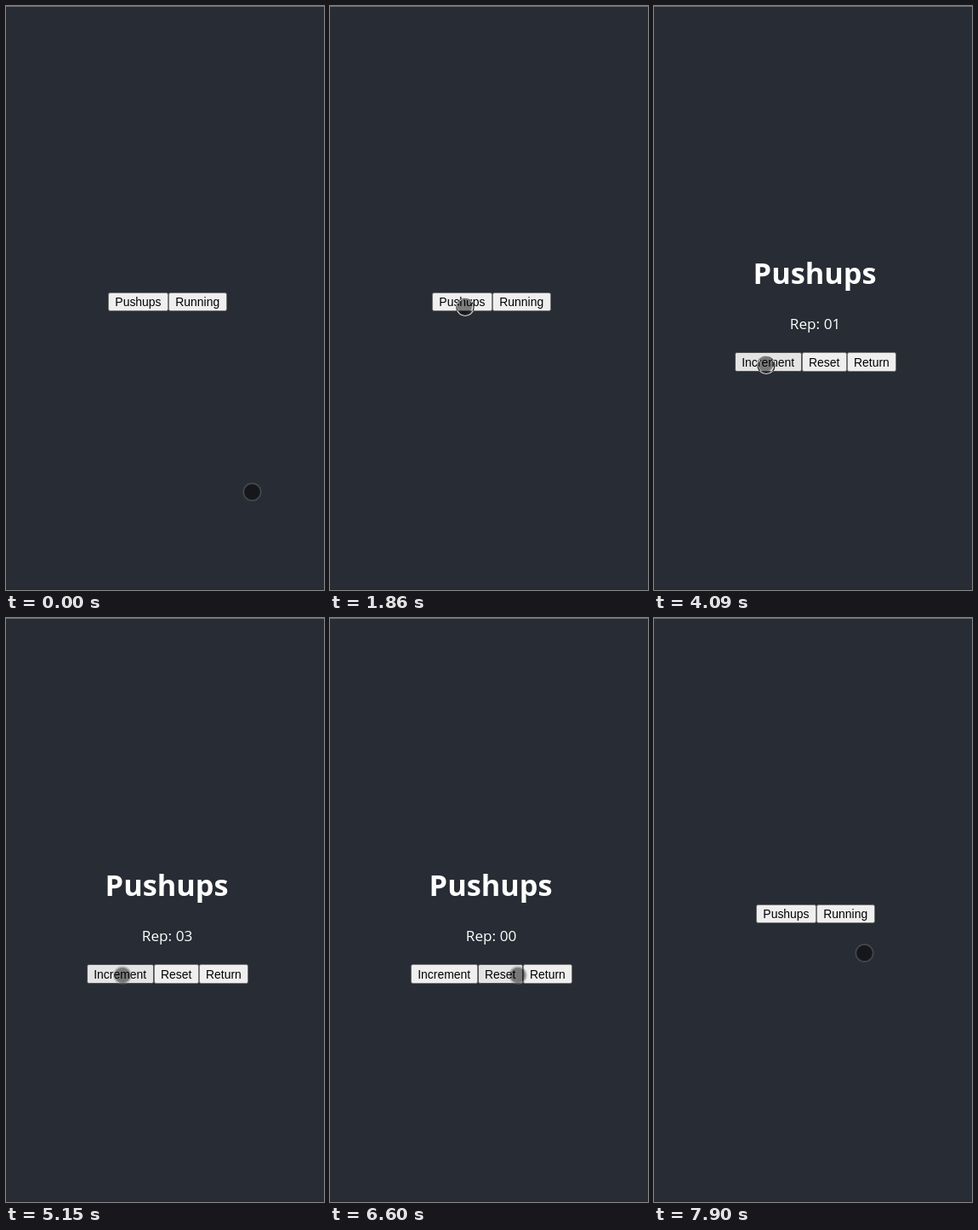
Write an HTML page that moves like this. It is 374 by 685 pixels and loops after 8000 ms.

```html
<!DOCTYPE html>
<html lang="en">
<head>
<meta charset="utf-8">
<title>Rep counter</title>
<style>
  html, body { margin: 0; width: 100%; height: 100%; overflow: hidden; background: #282c34; }
  svg { display: block; width: 374px; height: 685px; }
  text { fill: #fff; font-family: "Open Sans", "Noto Sans", sans-serif; white-space: pre; }
  .button rect { fill: #efefef; stroke: #767676; }
  .button text { fill: #000; font: 13.93px "Liberation Sans", Arial, sans-serif; }
  .button.hover rect { fill: #e4e4e4; stroke: #4f4f4f; }
  .button.active rect { fill: #f5f5f5; stroke: #8d8d8d; }
  #ring { fill: none; stroke: #fff; stroke-width: 1.2; mix-blend-mode: difference; }
</style>
</head>
<body>
<svg viewBox="0 0 374 685">
  <defs>
    <radialGradient id="shade">
      <stop offset=".78" stop-opacity=".48"/>
      <stop offset="1" stop-opacity=".34"/>
    </radialGradient>
  </defs>
  <rect width="374" height="685" fill="#282c34"/>
  <rect width="374" height="1" fill="#6a6d72"/>
  <rect y="684" width="374" height="1" fill="#23272e"/>
  <g id="menu"></g>
  <g id="counter">
    <text x="116.6" y="326" font-size="34.3" font-weight="700">Pushups</text>
    <text id="reps" x="159.8" y="379" font-size="17.2"></text>
  </g>
  <g id="cursor">
    <circle r="9.6" fill="url(#shade)"/>
    <circle id="edge" r="10.2" fill="none" stroke="#808488" stroke-opacity=".32" stroke-width="1.7"/>
  </g>
  <circle id="ring" r="10"/>
</svg>
<script>
const LOOP = 8000;
const FRAME = 110;
const PRESS = 150;
const RELEASE = 120;
const $ = id => document.getElementById(id);

function svgNode(parent, name, attrs) {
  const node = document.createElementNS("http://www.w3.org/2000/svg", name);
  for (const key in attrs) node.setAttribute(key, attrs[key]);
  return parent.appendChild(node);
}

// Lays labelled buttons side by side, each as wide as its text plus padding
const buttons = {};
function buttonRow(parent, labels, left, top, height) {
  const padding = 8.36;
  for (const label of labels) {
    const group = svgNode(parent, "g", { class: "button" });
    const box = svgNode(group, "rect", { y: top + .5, height: height - 1, rx: 2 });
    const text = svgNode(group, "text", { x: left + padding, y: top + height - 6 });
    text.textContent = label;
    const right = left + text.getComputedTextLength() + 2 * padding;
    const snapped = Math.round(left);
    box.setAttribute("x", snapped + .5);
    box.setAttribute("width", Math.round(right) - snapped - 1);
    buttons[label] = group;
    left = right;
  }
}
buttonRow($("menu"), ["Pushups", "Running"], 120, 336, 22);
buttonRow($("counter"), ["Increment", "Reset", "Return"], 94.9, 406, 23);

const glides = [
  { start: 240, end: 240, x: 281, y: 561 },
  { start: 380, end: 840, x: 223.5, y: 439 },
  { start: 960, end: 1090, x: 203, y: 403 },
  { start: 1190, end: 1860, x: 158, y: 352 },
  { start: 2450, end: 2890, x: 134, y: 417 },
  { start: 3010, end: 3150, x: 131, y: 420 },
  { start: 5150, end: 5150, x: 137, y: 419 },
  { start: 5260, end: 5590, x: 194, y: 420 },
  { start: 6400, end: 6600, x: 221, y: 419 },
  { start: 6710, end: 7080, x: 263, y: 420 },
  { start: 7770, end: 7900, x: 247.5, y: 393 }
];

const taps = [
  { at: 1960, on: "Pushups" },
  { at: 3610, on: "Increment" },
  { at: 4215, on: "Increment" },
  { at: 4785, on: "Increment" },
  { at: 6060, on: "Reset" },
  { at: 7410, on: "Return" }
];

const actions = {
  Pushups: state => { state.page = "counter"; },
  Increment: state => { state.reps++; },
  Reset: state => { state.reps = 0; },
  Return: state => { state.page = "menu"; }
};

function stateAt(time) {
  const state = { page: "menu", reps: 0 };
  for (const { at, on } of taps) {
    if (time < at) break;
    actions[on](state);
    state.touched = on;
    state.look = time < at + RELEASE ? "active" : "hover";
  }
  return state;
}

// The cursor advances in equal hops, one per recorded frame
function cursorAt(time) {
  let x = 289.5, y = 570;
  for (const glide of glides) {
    if (time < glide.start) break;
    const hops = Math.round((glide.end - glide.start) / FRAME) + 1;
    const interval = (glide.end - glide.start) / (hops - 1) || FRAME;
    const progress = Math.min(1, (Math.floor((time - glide.start) / interval + 1e-6) + 1) / hops);
    x += (glide.x - x) * progress;
    y += (glide.y - y) * progress;
  }
  return [x, y];
}

function show(node, visible) {
  node.style.display = visible ? "" : "none";
}

function draw(time) {
  const state = stateAt(time);
  show($("menu"), state.page === "menu");
  show($("counter"), state.page === "counter");
  $("reps").textContent = "Rep: " + String(state.reps).padStart(2, "0");
  for (const label in buttons) {
    const look = state.page === "counter" && label === state.touched ? state.look : "";
    buttons[label].setAttribute("class", "button " + look);
  }

  const [x, y] = cursorAt(time);
  $("cursor").setAttribute("transform", `translate(${x} ${y})`);
  $("ring").setAttribute("transform", `translate(${x + 1} ${y + 1.5})`);
  const pressed = taps.some(({ at }) => time >= at - PRESS && time < at);
  show($("ring"), pressed);
  show($("edge"), !pressed);
}

const began = performance.now();
function tick() {
  draw((performance.now() - began) % LOOP);
  requestAnimationFrame(tick);
}
tick();
</script>
</body>
</html>
```
